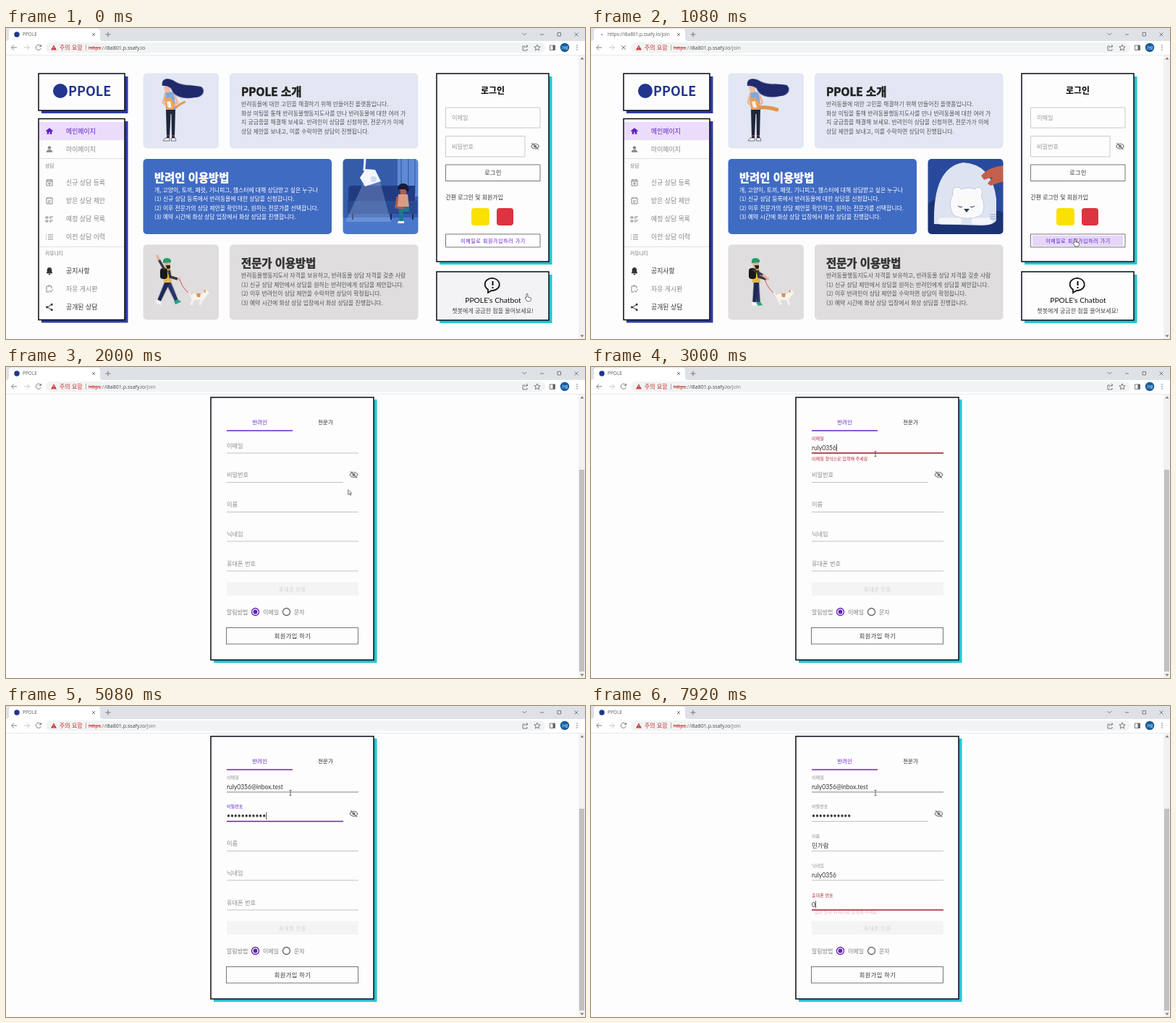
An HTML page that plays this animation: 800x430 px, repeating every 8000 ms.

```html
<!DOCTYPE html>
<html lang="ko">
<head>
<meta charset="utf-8">
<title>PPOLE</title>
<style>
html, body { margin: 0; width: 100%; height: 100%; overflow: hidden; background: #fefdfe; }
svg { display: block; width: 800px; height: 430px; }
text { font-family: "Noto Sans CJK KR", "Noto Sans CJK", sans-serif; white-space: pre; }
.ui text { font-family: "Open Sans", "Noto Sans CJK KR", sans-serif; }
.latin { font-family: Lato, "Noto Sans CJK KR", sans-serif; }
.mid { text-anchor: middle; }
.title { font-size: 15.4px; font-weight: 900; stroke-width: .6px; }
.body { font-size: 7.87px; stroke: none; }
.card { fill: #fefdfe; stroke: #080a14; stroke-width: 1.5; }
.line { fill: none; stroke: #6b6f73; stroke-width: .9; }
.box { fill: none; stroke: #bdbdbd; stroke-width: .8; }
.dark { stroke: #555; }
.mark { fill: #22358f; }

#cursor { animation: point 8s infinite; }
#page { animation: scroll 8s infinite; }
#thumb { animation: thumb 8s infinite; }
@keyframes point {
  0%, 1% { transform: translate(719px, 367px); animation-timing-function: ease-in-out; }
  9.4%, 21.5% { transform: translate(668px, 291px); animation-timing-function: ease-in-out; }
  27.1%, 100% { transform: translate(393px, 120px); }
}
@keyframes scroll {
  0%, 16.3% { transform: translateY(136px); animation-timing-function: ease-in-out; }
  20.8%, 100% { transform: none; }
}
@keyframes thumb {
  0%, 16.3% { transform: translateY(-96px); animation-timing-function: ease-in-out; }
  20.8%, 100% { transform: none; }
}
.swing { animation: swing .44444s ease-in-out infinite alternate; }
.back { animation-direction: alternate-reverse; }
@keyframes swing { from { transform: rotate(-24deg); } to { transform: rotate(24deg); } }
.paw { animation: paw .22222s ease-in-out infinite alternate; }
@keyframes paw { from { transform: skewX(-20deg); } to { transform: skewX(20deg); } }
#wave { transform-origin: 219px 334px; animation: wave 8s infinite; }
@keyframes wave { 0%, 5% { transform: none; } 9%, 100% { transform: rotate(150deg); } }
#walker { animation: walk 8s infinite; }
@keyframes walk { 0%, 5% { transform: none; } 12%, 100% { transform: translateX(5px); } }
#cattail { transform-origin: 235px 109px; animation: tail 8s infinite; }
@keyframes tail { 0%, 2% { transform: rotate(-40deg) scale(.6); } 12%, 100% { transform: none; } }
#hair { transform-origin: 222px 74px; animation: sway 1s ease-in-out infinite alternate; }
@keyframes sway { from { transform: rotate(1.5deg); } to { transform: rotate(-1.5deg); } }
</style>
</head>
<body>
<svg viewBox="0 0 800 430">
<defs>
  <clipPath id="view"><rect y="37" width="791" height="393"/></clipPath>
  <clipPath id="photo"><rect x="465.500" y="181" width="104" height="104" rx="5"/></clipPath>
  <g id="eye" fill="none" stroke="#777" stroke-width="1.100">
    <path d="M-5.300 0C-3-4.600 3-4.600 5.300 0C3 4.600-3 4.600-5.300 0Z"/>
    <circle r="1.500" fill="#777"/><path d="M-4.500-4.500L4.500 4.500"/>
  </g>
</defs>
<rect width="800" height="430" fill="#fefdfe"/>

<g clip-path="url(#view)">
<g data-show="0-1170">
  <path fill="#2c3b9f" d="M49 67h119.500v51H49zM49 129h119.500v278.500H49z"/>
  <rect class="card" x="45" y="63" width="119" height="51"/>
  <rect class="card" x="45" y="125.500" width="119" height="278"/>
  <circle class="mark" cx="75" cy="87" r="10"/>
  <text x="86" y="94" font-size="18" font-weight="700" fill="#22358f">PPOLE</text>
  <rect x="46" y="130" width="117" height="25" fill="#ebdcfb"/>
  <path d="M46 180.500h117M46 302.500h117" stroke="#e0e0e0"/>
  <g id="menu"></g>

  <g fill="#e2e7f3"><rect x="189.500" y="62.500" width="104.500" height="104" rx="5"/><rect x="309" y="62.500" width="260.500" height="104" rx="5"/></g>
  <rect x="189.500" y="181" width="260.500" height="104" rx="5" fill="#406bc3"/>
  <g fill="#dfdddd"><rect x="189.500" y="299.500" width="104.500" height="104" rx="5"/><rect x="309" y="299.500" width="260.500" height="104" rx="5"/></g>
  <g id="about"></g>

  <g>
    <path d="M221 112h13l-1 40h-4l-.5-33h-1L226 152h-4z" fill="#20263c"/>
    <path d="M220 152h6v4h-9zM229 152h5l1 4h-7z" fill="#f5f5f7" stroke="#20263c" stroke-width=".6"/>
    <path d="M222 149h4M229 149h4" stroke="#d94b45"/>
    <path d="M219 90q6-4 13 0l3 23h-14z" fill="#7fa9d6"/>
    <path d="M220 91l-3 12 8 8M232 91l5 12-9 8" fill="none" stroke="#f0b39c" stroke-width="2.600"/>
    <path d="M219 99l1-4 3 2 4-1 6 8-2 9h-9z" fill="#e9a25c"/><path d="M222 102l5-1 2 9h-5z" fill="#fbeedd"/>
    <path id="cattail" d="M234 110q10-1 23 3" fill="none" stroke="#e0964f" stroke-width="5" stroke-linecap="round"/>
    <path d="M218 77h9v10q-4 5-8 0z" fill="#f4b9a2"/>
    <path id="hair" d="M216 80C214 69 225 68 234 74C244 80 256 77 270 80C276 84 274 94 262 95C246 98 233 96 228 83Q222 79 216 80Z" fill="#20296b"/>
  </g>

  <g clip-path="url(#photo)">
    <g data-show="0-540">
      <rect x="465" y="181" width="105" height="104" fill="#355ca9"/>
      <path d="M541 181h29v52h-29z" fill="#5f89d3"/><path d="M546 181v48M556 181v48M565 181v48" stroke="#466fbd" stroke-width="2"/>
      <rect x="465" y="262" width="105" height="23" fill="#4a77cb"/>
      <path d="M473 221q2-4 10-3h82v31h-92z" fill="#213b82"/><path d="M472 239h96v18h-96z" fill="#294991"/>
      <path d="M479 257v8M532 257v8M562 257v8" stroke="#182a5a" stroke-width="2"/>
      <path d="M493 216l24-3 15 55h-63z" fill="#c8dcff" opacity=".25"/>
      <path d="M496 181l-1 15 13 9" fill="none" stroke="#eef3ff" stroke-width="3"/>
      <path d="M497 195l13 1 8 16-22 7-7-12z" fill="#f4f6fd"/><circle cx="508" cy="209" r="4" fill="#cbd9f4"/>
      <path d="M542 230h13l2 18h-17z" fill="#db9c86"/><path d="M542 247h15v7h-8v13h-5z" fill="#1f7693"/>
      <path d="M541 233l-2 15 11 1" fill="none" stroke="#a85f51" stroke-width="3"/>
      <path d="M544 221h9v9h-8z" fill="#a85f51"/><path d="M541 223q1-9 9-8 8 1 6 12l-5-4z" fill="#151b3b"/>
      <path d="M542 267h8v3h-9z" fill="#f0f1f8"/>
    </g>
    <g data-show="540-1170">
      <rect x="465" y="181" width="105" height="104" fill="#294a9c"/>
      <path d="M465 285v-42l16-10 89 22v30z" fill="#1b3273"/>
      <path d="M474 271q-2-78 40-85 40 2 46 50v30q-4 7-20 7z" fill="#dde3f0"/>
      <path d="M500 230q-2-9 5-10 5 0 7 3 10-4 18 0 3-4 7-2 6 3 2 11 8 16 0 27-18 9-38 0-9-14-1-29z" fill="#fbfafb" stroke="#c3cbdd"/>
      <path d="M507 246q3 3 6 1M530 246q-3 3-6 1" fill="none" stroke="#303957"/>
      <path d="M515 250h8l-4 5z" fill="#303957"/>
      <path d="M484 267h24M530 267h20" stroke="#f4f5f9" stroke-width="9" stroke-linecap="round"/>
      <path d="M570 190q-20 2-31 14l4 6 12-4-7 9 4 3 18-6z" fill="#c2604c"/>
      <path d="M551 258h9M551 261h9M551 264h9" stroke="#8ea5d4"/>
    </g>
  </g>

  <g id="walker">
    <g class="swing" style="transform-origin:223px 350px"><path d="M220 349h7l-1 30h-5z" fill="#27346b"/><path d="M220 379h6l3 5h-9z" fill="#2ba47e"/></g>
    <g class="swing back" style="transform-origin:223px 350px"><path d="M220 349h7l-1 30h-5z" fill="#1d2855"/><path d="M220 379h6l3 5h-9z" fill="#f3f4f5"/></g>
    <path d="M217 332q7-3 11 2l1 18h-11z" fill="#e1b844"/>
    <rect x="213" y="332" width="10" height="15" rx="4" fill="#18191e"/>
    <path d="M225 335l2 9 10 3" fill="none" stroke="#363844" stroke-width="3.500"/>
    <circle cx="239" cy="347" r="2" fill="#e9ad93"/>
    <g id="wave"><path d="M219 334l-8-14" stroke="#363844" stroke-width="3.500"/><path d="M211 320l-2-5" stroke="#e9ad93" stroke-width="3" stroke-linecap="round"/></g>
    <path d="M218 322h9v9q-5 4-8-1z" fill="#e9ad93"/><path d="M221 328h6v4q-5 4-6-4z" fill="#22242b"/>
    <path d="M217 325q-1-7 5-7 7 0 6 6z" fill="#249c70"/>
  </g>
  <path d="M240 348q6 17 20 23" fill="none" stroke="#d83c45" stroke-width=".9"/>
  <g fill="none" stroke="#f7f4f0" stroke-width="1.700">
    <path class="paw" style="transform-origin:258px 374px" d="M258 374v9M270 374v9"/>
    <path class="paw back" style="transform-origin:258px 374px" d="M260 374v9M272 374v9"/>
    <path d="M257 370q-4-1-4-5" stroke-linecap="round"/>
  </g>
  <path d="M257 368l15-1 1-4 4-1 4 5-4 3-3 5-3 1h-13l-3-4z" fill="#f8f4ed"/>
  <path d="M263 367h6l-1 5h-4zM273 363l3-1-1 5z" fill="#e08f48"/>

  <path fill="#1fc6d4" d="M599 67h155.500v260H599zM599 341h155.500v67H599z"/>
  <rect class="card" x="595" y="63" width="155" height="260"/>
  <rect class="card" x="595" y="337" width="155" height="67"/>
  <rect data-show="0-380" x="596" y="338" width="153" height="65" fill="#f3f2f4"/>
  <path class="box" d="M607.500 110h130.500v28H607.500zM607.500 149.500H717v28.500H607.500z"/>
  <rect data-show="620-1170" x="610" y="287" width="125" height="14.500" fill="#e6d6fa"/>
  <path class="box dark" d="M607.500 189H738v22.500H607.500zM607.500 285H738v18H607.500z"/>
  <use href="#eye" x="731" y="163.500"/>
  <text class="mid" x="672.500" y="91" font-size="12" font-weight="600">로그인</text>
  <g font-size="8.200" fill="#999"><text x="616" y="127">이메일</text><text x="616" y="166.500">비밀번호</text></g>
  <text class="mid" x="673" y="203" font-size="8" letter-spacing=".5" fill="#333">로그인</text>
  <text x="607.500" y="237" font-size="7.900" fill="#333">간편 로그인 및 회원가입</text>
  <rect x="643" y="249" width="25" height="24" rx="4" fill="#fae100"/>
  <rect x="678" y="249" width="23" height="24" rx="4" fill="#dc3440"/>
  <text class="mid" x="673" y="296.500" font-size="7" letter-spacing=".6" fill="#5f20c4">이메일로 회원가입하러 가기</text>
  <path d="M666 361.500a10 8.500 0 1 1 5 1.500l-5 3z" fill="none" stroke="#111" stroke-width="1.800"/>
  <path d="M672.500 350v6M672.500 358v2" stroke="#111" stroke-width="2"/>
  <text class="mid latin" x="673" y="380" font-size="10.300" fill="#111">PPOLE's Chatbot</text>
  <text class="mid" x="672.500" y="393.500" font-size="8" fill="#444">챗봇에게 궁금한 점을 물어보세요!</text>
</g>

<g data-show="1170-8000">
<g id="page">
  <path d="M287-69h225.500V34H287z" fill="#2c3b9f"/>
  <rect class="card" x="283" y="-73" width="225" height="103"/>
  <circle class="mark" cx="366" cy="-33" r="10"/>
  <text x="377" y="-26.500" font-size="18" font-weight="700" fill="#22358f">PPOLE</text>
  <text class="mid" x="395.500" y="9" font-size="11.800" font-weight="600">회원가입</text>
  <path d="M287 45h225.500v364H287z" fill="#1fc6d4"/>
  <rect class="card" x="283" y="42" width="225" height="363"/>
  <g class="mid" font-size="7.400"><text x="350.500" y="78.500" fill="#5f20c4">반려인</text><text x="441.500" y="78.500" fill="#222">전문가</text></g>
  <path d="M305 88h91" stroke="#6a25c9" stroke-width="1.500"/>
  <g id="fields"></g>
  <use href="#eye" x="480.500" y="149"/>
  <rect x="305" y="297.500" width="182" height="18.500" fill="#f5f4f5"/>
  <text class="mid" x="396" y="309.500" font-size="7" letter-spacing=".6" fill="#cfcfcf">휴대폰 인증</text>
  <g font-size="8" fill="#808080"><text x="305" y="341.500">알림방법</text><text x="355" y="341.500">이메일</text><text x="398" y="341.500">문자</text></g>
  <g fill="none" stroke-width="1.300"><circle cx="344.500" cy="338.500" r="5" stroke="#5f20b8"/><circle cx="387.500" cy="338.500" r="5" stroke="#666"/></g>
  <circle cx="344.500" cy="338.500" r="2.900" fill="#5f20b8"/>
  <rect class="box dark" x="304.500" y="360.500" width="182" height="22.500"/>
  <text class="mid" x="396" y="375" font-size="8.200" letter-spacing=".4" fill="#333">회원가입 하기</text>
</g>
</g>
</g>

<rect x="791" y="37" width="9" height="393" fill="#f2f1f2"/>
<path d="M793.500 43.500l2.500-3 2.500 3zM793.500 424.500l2.500 3 2.500-3z" fill="#777"/>
<g data-show="1170-8000"><rect id="thumb" x="792" y="142" width="7" height="279" fill="#c1c1c1"/></g>

<g class="ui">
  <rect width="800" height="18" fill="#dee1e6"/>
  <path d="M0 18q4 0 4-4V5q0-4 4-4h118q4 0 4 4v9q0 4 4 4h666v19.500H0z" fill="#fff"/>
  <path d="M0 37.500h800" stroke="#e4e4e8" stroke-width=".8"/>
  <rect x="55" y="20" width="690" height="14.500" rx="7.200" fill="#f1f3f4"/>
  <circle id="icon" class="mark" cx="15" cy="9" r="3.700"/>
  <text id="tab" x="23" y="11" font-size="6.500" fill="#55595d"></text>
  <path class="line" d="M119 7l4 4M123 7l-4 4M137.500 9h7M141 5.500v7M713.500 7l2.800 2.800 2.800-2.800M738 9h5M762 6.500h4.500v4.500H762zM785.500 6.500l5 5M790.500 6.500l-5 5"/>
  <path class="line" d="M15 27H8M11 23.500L7.500 27l3.500 3.500"/>
  <path class="line" style="stroke:#b8bbbe" d="M25 27h7M29 23.500l3.500 3.500-3.500 3.500"/>
  <path id="reload" class="line"/>
  <path d="M66 23.500l4 7h-8z" fill="#c33"/><path d="M66 26v2M66 29v.8" stroke="#fff" stroke-width=".8"/>
  <text x="74" y="30" font-size="8" fill="#c5302b" style="font-family:'Noto Sans CJK KR',sans-serif">주의 요함</text>
  <path d="M110.500 23v8" stroke="#999" stroke-width=".8"/>
  <text x="114" y="30" font-size="7.050" fill="#444"><tspan fill="#c5302b" text-decoration="line-through">https</tspan><tspan fill="#777">://</tspan>i8a801.p.ssafy.io<tspan id="path" fill="#777"></tspan></text>
  <path class="line" d="M717 25h-3v6h6v-2M716 28q1-3 5-3M719 23l2 2-2 2"/>
  <path class="line" d="M734 23l1.200 2.800 3 .2-2.300 2 .7 3-2.600-1.600-2.600 1.600.7-3-2.300-2 3-.2z"/>
  <path class="line" d="M751.500 24h7v6.500h-7z"/><path d="M755.500 24h3v6.500h-3z" fill="#5f6368"/>
  <circle cx="772" cy="27" r="6.200" fill="#145da0"/><text class="mid" x="772" y="29" font-size="5" fill="#fff">가람</text>
  <path d="M789 24v.01M789 27v.01M789 30v.01" stroke="#5f6368" stroke-width="1.500" stroke-linecap="round"/>
</g>

<g id="cursor" fill="#fff" stroke="#333" stroke-width=".7">
  <path data-show="0-380 620-1170" d="M0 1q1-2 2 0v4l4 1q1 1 0 4l-1 1H1l-3-5q1-1 2 0z"/>
  <path data-show="380-620 1170-2150" d="M0 0v7l1.700-1.500L3 8l1-.5-1.200-2.300H5z"/>
  <path data-show="2150-8000" d="M-1.500-3.500h3M0-3.500v7M-1.500 3.500h3"/>
</g>
</svg>
<script>
const $ = id => document.getElementById(id);
const clamp = v => Math.max(0, Math.min(1, v));
const GRAY = '#888', INK = '#333', PURPLE = '#5f20c4', RED = '#b3243a';
const LOOP = 8000;

const board = 'M-4-4h8v8h-8zM-2-5v2M2-5v2M-2 0h4M-2 2h3';
const list = 'M-5-3h1M-2-3h7M-5 0h1M-2 0h7M-5 3h1M-2 3h7';
const dot = 'a1.2 1.2 0 1 0 2.4 0a1.2 1.2 0 1 0-2.4 0';
const menu = [
  [142.5, '메인페이지', PURPLE, 'M-5 0L0-4 5 0H3v4H1V1h-2v3h-2V0z', 1],
  [167.5, '마이페이지', GRAY, 'M-2-2a2 2 0 1 0 4 0a2 2 0 1 0-4 0M-4 4q0-3 4-3t4 3z', 1],
  [214, '신규 상담 등록', GRAY, 'M-4-4h8v8h-8zM-4-2h8M-2-5v2M2-5v2M0-1v4M-2 1h4'],
  [239, '받은 상담 제안', GRAY, board],
  [264, '예정 상담 목록', GRAY, 'M-5-3h3v2h-3zM-5 2h3v2h-3zM0-3h5M0-1h3M0 2h5M0 4h3'],
  [289, '이전 상담 이력', GRAY, list],
  [336, '공지사항', INK, 'M-4 3l1-2v-3q0-2 3-3 3 1 3 3v3l1 2zM-1 4h2v1h-2z', 1],
  [361, '자유 게시판', GRAY, 'M3-1v-3h-7v8h4M-2-5h3M0 2l2 2 3-4'],
  [386, '공개된 상담', INK, `M3-3.5L-3 0 3 3.5L-3 0zM2-3.7${dot}M-4.7 0${dot}M2 3.7${dot}`, 1]
];
$('menu').innerHTML = menu.map(([y, label, color, icon, solid]) =>
  `<path transform="translate(60 ${y})" d="${icon}" fill="${solid ? color : 'none'}" stroke="${color}" stroke-width="${solid ? .6 : 1}"/>
   <text x="83" y="${y + 3.2}" font-size="8.9" fill="${color}">${label}</text>`).join('') +
  [[190.5, '상담'], [312, '커뮤니티']].map(([y, s]) =>
    `<text x="54" y="${y + 2.3}" font-size="6.8" fill="#777">${s}</text>`).join('');

const about = [
  [325, 94, '#222', '#555', 'PPOLE 소개', '반려동물에 대한 고민을 해결하기 위해 만들어진 플랫폼입니다.',
    '화상 미팅을 통해 반려동물행동지도사를 만나 반려동물에 대한 여러 가', '지 궁금증을 해결해 보세요. 반려인이 상담을 신청하면, 전문가가 이에', '상담 제안을 보내고, 이를 수락하면 상담이 진행됩니다.'],
  [205, 212.5, '#fff', '#fff', '반려인 이용방법', '개, 고양이, 토끼, 패럿, 기니피그, 햄스터에 대해 상담받고 싶은 누구나',
    '(1) 신규 상담 등록에서 반려동물에 대한 상담을 신청합니다.', '(2) 이후 전문가의 상담 제안을 확인하고, 원하는 전문가를 선택합니다.', '(3) 예약 시간에 화상 상담 입장에서 화상 상담을 진행합니다.'],
  [325, 331, '#333', '#555', '전문가 이용방법', '반려동물행동지도사 자격을 보유하고, 반려동물 상담 자격을 갖춘 사람',
    '(1) 신규 상담 제안에서 상담을 원하는 반려인에게 상담을 제안합니다.', '(2) 이후 반려인이 상담 제안을 수락하면 상담이 확정됩니다.', '(3) 예약 시간에 화상 상담 입장에서 화상 상담을 진행합니다.']
];
$('about').innerHTML = about.map(([x, y, ink, color, title, ...lines]) =>
  `<text class="title" x="${x}" y="${y}" fill="${ink}" stroke="${ink}">${title}</text>` +
  lines.map((s, i) => `<text class="body" x="${x}" y="${y + 14 + i * 12.6}" fill="${color}">${s}</text>`).join('')).join('');

// Each typing entry is [start, end, the whole value after every keystroke].
const prefixes = (s, from = 1) => Array.from({ length: s.length - from + 1 }, (_, i) => s.slice(0, from + i));
const user = 'ruly0356', email = user + '@inbox.test';
const fields = [
  { label: '이메일', y: 119, focus: 2170, blur: 3920, hover: 2150,
    typing: [[2400, 2920, prefixes(user)], [3170, 3800, prefixes(email, user.length + 1)]],
    error: '이메일 형식으로 입력해 주세요.', bad: [2400, 3740] },
  { label: '비밀번호', y: 159.5, end: 466, focus: 3920, blur: 5130, typing: [[4200, 5000, prefixes('•'.repeat(11))]] },
  { label: '이름', y: 200.5, focus: 5130, blur: 5900, typing: [[5300, 5800, ['ㅁ', '미', '민', '민ㄱ', '민가', '민갈', '민가라', '민가람']]] },
  { label: '닉네임', y: 241, focus: 5900, blur: 7250, typing: [[6420, 7080, prefixes(user)]] },
  { label: '휴대폰 번호', y: 282, focus: 7250, blur: LOOP, typing: [[7830, 7830, ['0']]],
    error: '- 없이 숫자 11자리로 입력해 주세요.', bad: [7830, LOOP] }
];
$('fields').innerHTML = fields.map(f => `<g>
  <path d="M305 ${f.y}H${f.end || 487}" stroke-width=".9"/><path/>
  <text font-size="8.2">${f.label}</text>
  <text class="latin" x="305" y="${f.y - 4.5}" font-size="8.5" fill="#333"></text>
  <path stroke="#222" stroke-width=".8"/>
  <text x="305" font-size="6.05" fill="${RED}">${f.error || ''}</text></g>`).join('');
fields.forEach((f, i) => [f.line, f.bar, f.name, f.value, f.caret, f.note] = $('fields').children[i].children);

function drawField(f, t) {
  let text = '', lastKey = f.focus;
  for (const [from, to, keys] of f.typing) {
    const step = (to - from) / (keys.length - 1) || 1;
    const i = Math.min(keys.length - 1, Math.floor((t - from) / step));
    if (i >= 0) { text = keys[i]; lastKey = from + i * step; }
  }
  const active = t >= f.focus && t < f.blur;
  const bad = f.bad && t >= f.bad[0] && t < f.bad[1];
  const color = bad ? RED : PURPLE;
  const float = clamp((t - f.focus) / 150);
  const grow = active ? clamp((t - f.focus) / 180) : 0;
  const mid = (305 + (f.end || 487)) / 2, half = (mid - 305) * grow;
  f.line.setAttribute('stroke', t >= f.hover ? '#777' : '#bcbcbc');
  f.bar.setAttribute('d', `M${mid - half} ${f.y}H${mid + half}`);
  f.bar.setAttribute('stroke', active ? color : 'none');
  f.bar.setAttribute('stroke-width', 1.5);
  f.name.setAttribute('fill', active ? color : '#8b8b8b');
  f.name.setAttribute('transform', `translate(305 ${f.y - 7.5 - 11 * float}) scale(${1 - .26 * float})`);
  if (f.value.textContent !== text) f.value.textContent = text;
  const blink = t - f.focus > 170 && (t - lastKey) % 1060 < 530;
  const x = 305.5 + (text ? f.value.getComputedTextLength() : 0);
  f.caret.setAttribute('d', active && blink ? `M${x} ${f.y - 12.5}v10` : '');
  const fade = bad ? clamp((t - f.bad[0]) / 250) : 0;
  f.note.setAttribute('opacity', fade);
  f.note.setAttribute('y', f.y + 9.5 - 7 * (1 - fade));
}

const timed = [...document.querySelectorAll('[data-show]')].map(el =>
  [el, el.dataset.show.split(' ').map(span => span.split('-').map(Number))]);
let start;
function draw(now) {
  start ??= now;
  const t = (now - start) % LOOP;
  for (const [el, spans] of timed)
    el.style.visibility = spans.some(([a, b]) => t >= a && t < b) ? 'inherit' : 'hidden';
  const loading = t >= 1000 && t < 1250;
  $('tab').textContent = loading ? 'https://i8a801.p.ssafy.io/join' : 'PPOLE';
  $('path').textContent = t >= 1000 ? '/join' : '';
  $('icon').setAttribute('r', loading ? .8 : 3.7);
  $('reload').setAttribute('d', loading ? 'M42 24l6 6M48 24l-6 6' : 'M48 25a3.600 3.600 0 1 0 .3 3M48.500 23v2.700h-2.700');
  fields.forEach(f => drawField(f, t));
  requestAnimationFrame(draw);
}
requestAnimationFrame(draw);
</script>
</body>
</html>
```
